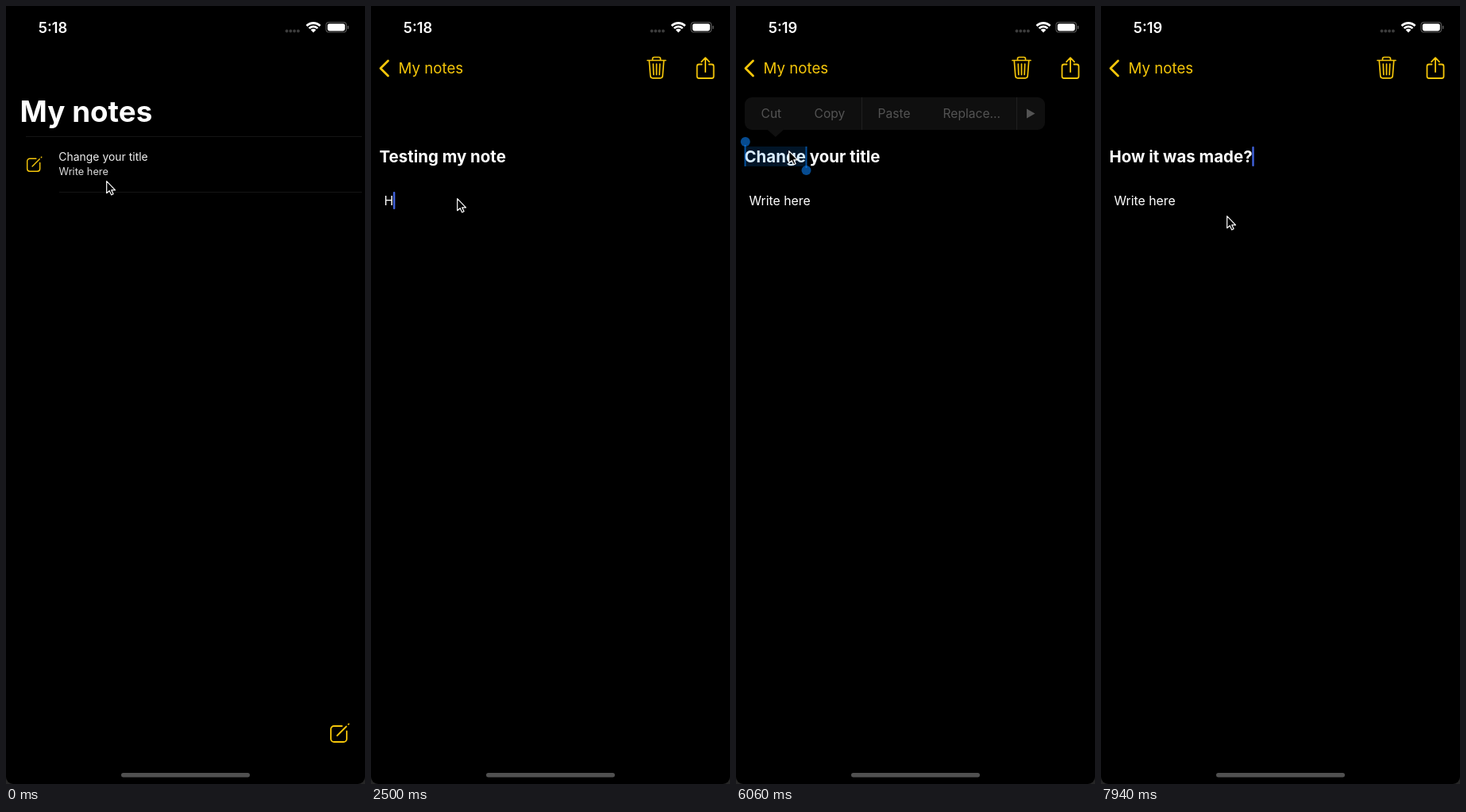
Animation of 452x980 px, one loop 8000 ms. Source, as an HTML page with a canvas:

```html
<!DOCTYPE html>
<html lang="en">
<head>
<meta charset="utf-8">
<title>My notes</title>
<style>
  html, body { margin: 0; width: 100%; height: 100%; overflow: hidden; background: #262626; }
  canvas { display: block; border-radius: 0 0 9px 9px; }
</style>
</head>
<body>
<canvas id="stage" width="452" height="980"></canvas>
<script>
const ctx = document.getElementById('stage').getContext('2d');
const LOOP = 8000, WIDTH = 452;
const YELLOW = '#f5c60a', WHITE = '#fff', BLUE = '#0a84ff', CARET = '#4062dc';
const LINE = '#151515', BATTERY = '#5c5c5c';

const ICONS = {
  compose: new Path2D('M15.5 3.5H5.5a4 4 0 0 0-4 4v12a4 4 0 0 0 4 4h12a4 4 0 0 0 4-4v-9.5M9.5 15.5L21 4M23.6 1.4l.5-.5'),
  trash: new Path2D('M348 68.5H371M354.5 68V66.5Q354.5 64.5 356.5 64.5H362.5Q364.5 64.5 364.5 66.5V68' +
    'M350.3 69L351.8 88Q352 90.8 354.7 90.8H364.3Q367 90.8 367.2 88L368.7 69M355.3 73L355.8 86.5M359.5 73V86.5M363.7 73L363.2 86.5'),
  share: new Path2D('M416.5 73.5H413Q410.5 73.5 410.5 76V88.5Q410.5 91 413 91H429Q431.5 91 431.5 88.5V76Q431.5 73.5 429 73.5H425.5' +
    'M421 83V65.5M416 70.3L421 65.2L426 70.3'),
  back: new Path2D('M21.5 69L12 78.5L21.5 88'),
  arrow: new Path2D('M0 0V15L3.5 12L6 17.2L8.4 16.1L6.1 11.2H10.8Z')
};

const TITLE = { x: 11, base: 197, top: 177, height: 25, font: [20.45, 700] };
const BODY = { x: 17, base: 251, top: 234, height: 22, font: [15.83, 400] };

// Typed fields: placeholder until the start, then one character per step.
const NOTES = [
  { title: ['Testing my note', 640, 52], body: ['Here goes the content of my note,', 2460, 53] },
  { title: ['How it was made?', 6740, 58], body: ['', LOOP + 1, 50] }
];
const SELECTIONS = [
  { from: 480, to: 640, field: TITLE, text: 'Change your title' },
  { from: 2150, to: 2460, field: BODY, text: 'Write here' },
  { from: 6000, to: 6440, field: TITLE, text: 'Change' },
  { from: 6440, to: 6740, field: TITLE, text: 'Change your title' }
];
const POINTER = [
  [0, 126, 220], [430, 126, 220], [560, 123, 195], [1650, 123, 195], [1950, 108, 242],
  [4250, 108, 242], [4750, 18, 75], [4950, 18, 75], [5290, 418, 912], [5400, 418, 912],
  [5700, 200, 300], [5950, 66, 182], [6200, 66, 182], [6420, 126, 187], [7400, 126, 187],
  [7750, 158, 264], [LOOP, 158, 264]
];

const ramp = (t, from, to) => Math.min(1, Math.max(0, (t - from) / (to - from)));
const easeOut = k => 1 - (1 - k) ** 3;
const smooth = k => k * k * (3 - 2 * k);

function setFont([size, weight]) {
  ctx.font = `${weight} ${size}px Inter, "Open Sans", sans-serif`;
}

function text(string, x, y, font, color = WHITE) {
  setFont(font);
  ctx.fillStyle = color;
  ctx.fillText(string, x, y);
}

function textWidth(string, font) {
  setFont(font);
  return ctx.measureText(string).width;
}

function box(x, y, w, h, r, color) {
  ctx.fillStyle = color;
  ctx.beginPath();
  ctx.roundRect(x, y, w, h, r);
  ctx.fill();
}

function disc(x, y, r, color) {
  box(x - r, y - r, 2 * r, 2 * r, r, color);
}

function outline(path, width, color = YELLOW) {
  ctx.strokeStyle = color;
  ctx.lineWidth = width;
  ctx.lineCap = ctx.lineJoin = 'round';
  ctx.stroke(path);
}

function layer(dx, dy, alpha, draw) {
  ctx.save();
  ctx.translate(dx, dy);
  ctx.globalAlpha *= alpha;
  draw();
  ctx.restore();
}

function composeIcon(x, y, scale) {
  layer(x, y, 1, () => {
    ctx.scale(scale, scale);
    outline(ICONS.compose, 1.8);
  });
}

function typed([string, start, step], placeholder, t) {
  return t < start ? placeholder : string.slice(0, Math.floor((t - start) / step) + 1);
}

function noteText(note, t) {
  return { title: typed(note.title, 'Change your title', t), body: typed(note.body, 'Write here', t) };
}

function drawStatus(t) {
  text(t < 3700 ? '5:18' : '5:19', 40.7, 33.5, [18.3, 600]);
  for (let i = 0; i < 4; i++) disc(353.5 + i * 4.8, 31.5, 1.9, '#3c3c3c');
  for (const [radius, width] of [[2.4, 4.8], [7.6, 2.8], [12, 2.8]]) {
    ctx.beginPath();
    ctx.arc(387, 33.5, radius, -Math.PI * 0.75, -Math.PI * 0.25);
    ctx.lineWidth = width;
    ctx.lineCap = 'butt';
    ctx.strokeStyle = WHITE;
    ctx.stroke();
  }
  box(402.5, 20, 26.5, 13.5, 4, BATTERY);
  box(403.5, 21, 24.5, 11.5, 3.2, '#000');
  box(404.8, 22.2, 22, 9.2, 2.4, WHITE);
  box(429.8, 24.8, 1.6, 4.2, 1, BATTERY);
}

function drawHomeBar(t) {
  const dim = ramp(t, 900, 1200) * (1 - ramp(t, 1350, 1700));
  const shade = Math.round(80 - 46 * dim);
  const fill = ctx.createLinearGradient(145, 0, 307, 0);
  fill.addColorStop(0, '#505050');
  fill.addColorStop(1, `rgb(${shade},${shade},${shade})`);
  box(145, 966, 162, 5.5, 2.75, fill);
}

function drawList(t) {
  text('My notes', 17.6, 145.5, [36.8, 700]);
  box(25, 164, 423, 1, 0, LINE);
  const rows = t > 5370 ? NOTES : NOTES.slice(0, 1);
  rows.forEach((note, i) => {
    const { title, body } = noteText(note, t), y = i * 70;
    composeIcon(25.5, 189.5 + y, 0.8);
    text(title, 66.3, 195 + y, [13.95, 400], '#eee');
    text(body, 66.5, 213 + y, [12.8, 400], '#ddd');
    box(67, 234 + y, 381, 1, 0, LINE);
  });
  composeIcon(407.5, 903.5, 1);
}

function drawNav() {
  outline(ICONS.back, 2.8);
  text('My notes', 34.5, 85, [18.7, 400], YELLOW);
  outline(ICONS.trash, 1.7);
  outline(ICONS.share, 1.8);
}

function drawMenu(top, tipX) {
  box(11, top, 378, 41, 9, '#333');
  ctx.beginPath();
  ctx.moveTo(tipX - 10, top + 41);
  ctx.lineTo(tipX, top + 50);
  ctx.lineTo(tipX + 10, top + 41);
  ctx.fill();
  box(158, top, 1, 41, 0, '#444');
  box(353, top, 1, 41, 0, '#444');
  const items = { Cut: 31.5, Copy: 98.5, Paste: 178.5, 'Replace...': 260.5 };
  for (const label in items) text(label, items[label], top + 26, [15.6, 400], '#eee');
  ctx.beginPath();
  ctx.moveTo(366, top + 14.5);
  ctx.lineTo(376.5, top + 20.5);
  ctx.lineTo(366, top + 26.5);
  ctx.fill();
}

function drawSelection({ field, text: selected }, fade) {
  const width = textWidth(selected, field.font);
  layer(field.x, field.top, Math.min(1, fade * 1.85), () => {
    box(0, 0, width, field.height, 0, 'rgba(10,132,255,.28)');
    box(-0.5, -2, 2, field.height + 2, 0, BLUE);
    box(width - 1, 0, 2, field.height + 2, 0, BLUE);
    disc(0.8, -6, 6, BLUE);
    disc(width, field.height + 5, 6, BLUE);
  });
  layer(0, 0, fade, () => drawMenu(field.top - 62, field.x + width / 2));
}

function drawNote(t) {
  const { title, body } = noteText(NOTES[t < 5250 ? 0 : 1], t);
  text(title, TITLE.x - 0.5, TITLE.base, TITLE.font);
  text(body, BODY.x - 0.5, BODY.base, BODY.font);

  const selection = SELECTIONS.find(s => t >= s.from && t < s.to);
  if (selection) {
    drawSelection(selection, ramp(t, selection.from, selection.from + 200));
    return;
  }
  const inBody = t > 2020 && t < 4850;
  const focused = (t > 470 && t < 4850) || t > 5960;
  const field = inBody ? BODY : TITLE;
  if (focused) {
    const end = field.x + textWidth(inBody ? body : title, field.font);
    box(end - 0.8, field.top, 2.4, field.height, 1, CARET);
  }
}

function drawPointer(t) {
  const next = POINTER.findIndex(p => p[0] > t);
  const [t0, x0, y0] = POINTER[next - 1], [t1, x1, y1] = POINTER[next];
  const k = smooth(ramp(t, t0, t1));
  layer(x0 + (x1 - x0) * k + 0.7, y0 + (y1 - y0) * k + 0.7, 1, () => {
    ctx.fillStyle = '#000';
    ctx.fill(ICONS.arrow);
    outline(ICONS.arrow, 1.2, WHITE);
  });
}

function draw(t) {
  ctx.fillStyle = '#000';
  ctx.fillRect(0, 0, WIDTH, 980);
  const open = easeOut(ramp(t, 130, 430)) - easeOut(ramp(t, 4920, 5220)) + easeOut(ramp(t, 5390, 5640));

  if (open < 1) layer(-136 * open, 0, 1 - open, () => drawList(t));
  if (open > 0) {
    layer(WIDTH * (1 - open), 0, 1, () => {
      ctx.fillStyle = '#000';
      ctx.fillRect(0, 100, WIDTH, 860);
      drawNote(t);
    });
    layer(60 * (1 - open), 0, open, drawNav);
  }
  drawStatus(t);
  drawHomeBar(t);
  drawPointer(t);
}

const started = performance.now();
function tick() {
  draw((performance.now() - started) % LOOP);
  requestAnimationFrame(tick);
}
tick();
</script>
</body>
</html>
```
